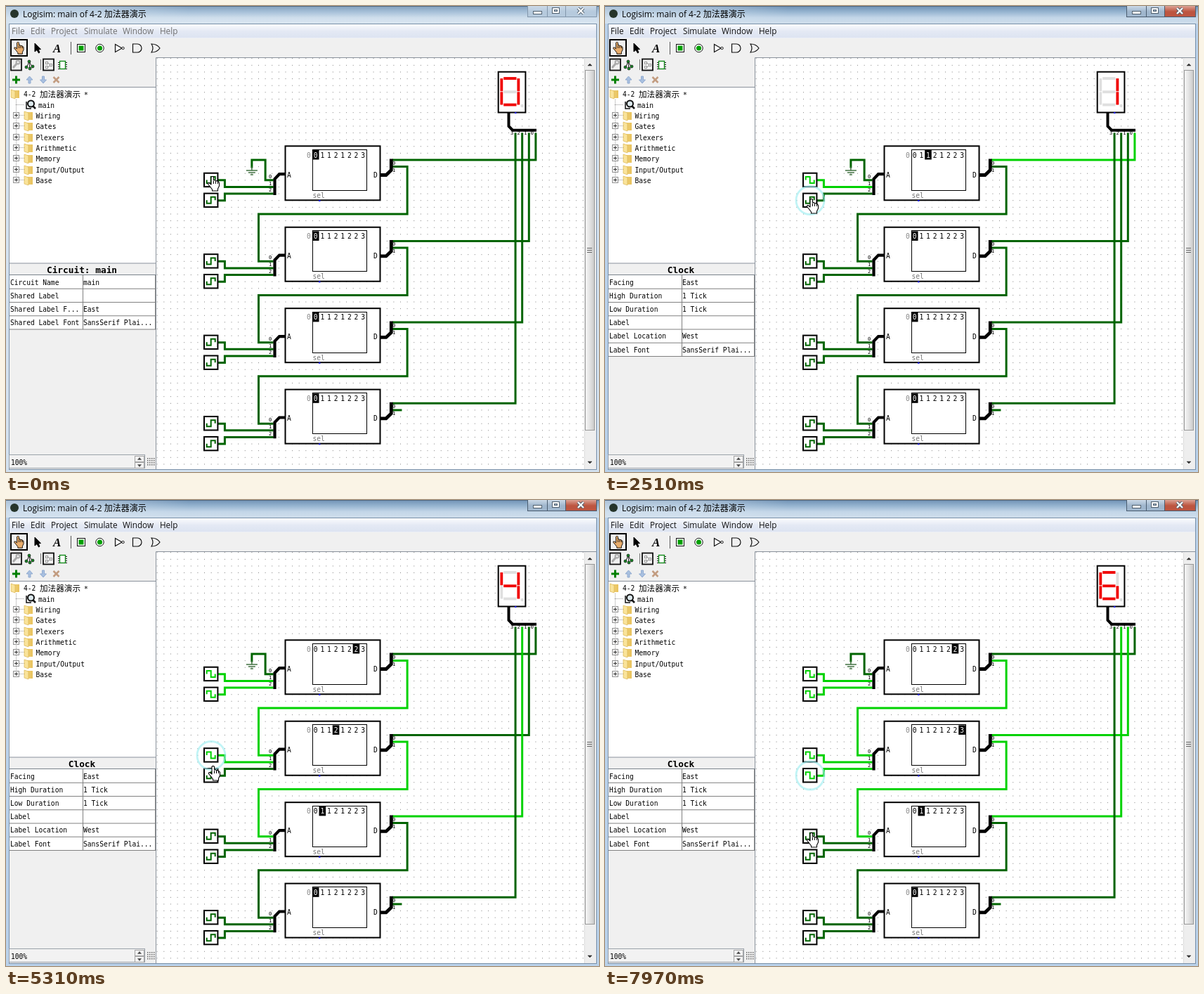
These frames come from a looping animation (844 px wide and 663 px high, 8 s). An HTML page with a canvas:

```html
<!DOCTYPE html>
<html lang="en">
<head>
<meta charset="utf-8">
<title>Adder circuit demo</title>
<style>
html, body { margin: 0; height: 100%; overflow: hidden; background: #f0f0f0; }
canvas { display: block; }
</style>
</head>
<body>
<canvas id="stage" width="844" height="663"></canvas>
<script>
const g = document.getElementById('stage').getContext('2d');
const MONO = '9.62px "DejaVu Sans Mono", monospace';
const TINY = '7px "DejaVu Sans Mono", monospace';
const UI = '11.7px "Open Sans", "Noto Sans CJK SC", "Noto Sans CJK", sans-serif';
const CJK = '11.6px "Noto Sans CJK SC", "Noto Sans CJK", sans-serif';
const SCALE = .962, GRID = 10 * SCALE, LOOP = 8000;
const X = i => 359.5 + GRID * i;
const Y = j => 219 + GRID * j;
const wireColor = on => on ? '#00d200' : '#006400';

function fill(x, y, w, h, color) {
  g.fillStyle = color;
  g.fillRect(x, y, w, h);
}
function frame(x, y, w, h, color, width = 1) {
  g.strokeStyle = color;
  g.lineWidth = width;
  g.strokeRect(x, y, w, h);
}
function line(points, color, width = 1, inside) {
  g.beginPath();
  points.forEach(p => g.lineTo(p[0], p[1]));
  if (inside) {
    g.closePath();
    g.fillStyle = inside;
    g.fill();
  }
  g.strokeStyle = color;
  g.lineWidth = width;
  g.stroke();
}
function circle(x, y, r, inside, color, width = 1) {
  g.beginPath();
  g.arc(x, y, r, 0, 7);
  if (inside) { g.fillStyle = inside; g.fill(); }
  if (color) { g.strokeStyle = color; g.lineWidth = width; g.stroke(); }
}
function text(s, x, y, color = '#000', font = MONO, align = 'left') {
  g.font = font;
  g.fillStyle = color;
  g.textAlign = align;
  g.fillText(s, x, y);
}
function gradient(x0, y0, x1, y1, ...colors) {
  const grad = g.createLinearGradient(x0, y0, x1, y1);
  colors.forEach((c, i) => grad.addColorStop(i / (colors.length - 1), c));
  return grad;
}
function hand(x, y, skin = '#fff', scale = 1) {
  g.save();
  g.translate(x, y);
  g.scale(scale, scale);
  g.lineJoin = 'round';
  line([[5, 1.5], [6, .5], [7.5, .5], [8.5, 1.5], [8.5, 6], [10.5, 5.5], [11.5, 7], [13.5, 6.5], [14.5, 8],
    [15.5, 8], [16.5, 9.5], [16.5, 14], [14.5, 18], [14.5, 21], [6.5, 21], [6.5, 19], [3.5, 15],
    [.5, 11.5], [.5, 10], [2, 9.5], [5, 12]], '#000', 1.1, skin);
  [8.5, 11.5, 14.5].forEach(k => line([[k, 7], [k, 11]], '#000'));
  g.restore();
}

// ---- window, menus and side panels ----
function windowFrame(active) {
  fill(0, 0, 844, 663, active ? '#b9d1ea' : '#d3e1ef');
  fill(0, 0, 844, 25, active ? gradient(0, 0, 0, 25, '#6f91b4', '#96b4d0', '#c3d6e8', '#cfdeec')
    : gradient(0, 0, 0, 25, '#829fbd', '#a6c0d8', '#cfdeec', '#dae6f1'));
  fill(0, 0, 260, 25, gradient(0, 0, 260, 0, 'rgba(215,228,240,.6)', 'rgba(215,228,240,.5)', 'rgba(215,228,240,0)'));
  fill(0, 0, 844, 1, '#52687f');
  circle(12, 11, 6, '#26352b');
  text('Logisim: main of 4-2 加法器演示', 24, 16, '#000', UI.replace('11.7', '12'));

  const tones = active ? ['#9fb6cd', '#9fb6cd', '#bd5540'] : ['#b6cadd', '#b6cadd', '#b6cadd'];
  [[742, 28], [770, 26], [796, 44]].forEach(([x, w], i) => {
    fill(x, 0, w, 16, gradient(0, 0, 0, 16, i == 2 && active ? '#dca294' : '#cbd9e7', tones[i], tones[i]));
    frame(x + .5, -.5, w, 16, active ? '#4b5d70' : '#8397ac');
  });
  fill(751, 8, 11, 4, '#fff');
  frame(750.5, 7.5, 12, 4, '#50606f');
  frame(777.5, 2.5, 10, 8, '#50606f');
  frame(779, 4, 7, 5, '#fff', 2);
  frame(780.5, 5.5, 4, 2, '#50606f');
  for (const [c, w] of [['#50606f', 4], ['#fff', 2.3]]) {
    line([[814, 3], [822, 11]], c, w);
    line([[822, 3], [814, 11]], c, w);
  }

  frame(4.5, 25.5, 836, 634, '#7990a8');
  fill(5, 26, 835, 633, '#f0f0f0');
  fill(5, 26, 835, 20, gradient(0, 26, 0, 46, '#fbfcfe', '#e4e9f4', '#dce3f1'));
  fill(5, 45, 835, 1, '#eceff6');
  const menu = { File: 8, Edit: 35, Project: 64, Simulate: 111, Window: 166, Help: 219 };
  for (const name in menu) text(name, menu[name], 39.5, active ? '#111' : '#707070', UI);
}

function toolbars() {
  frame(7, 48, 23, 23, '#000', 2);
  hand(11.5, 51, '#e9ad6c', .82);
  line([[41, 53], [41, 65], [44, 62.5], [46.5, 67], [48, 66], [46, 62], [49.5, 61.5]], '#000', 1, '#000');
  text('A', 67, 66, '#000', 'italic bold 17px "Liberation Serif", serif');
  fill(92, 51, 1, 18, '#555');
  fill(101.5, 54.5, 11, 11, '#fff');
  frame(101.5, 54.5, 11, 11, '#111');
  fill(103.5, 56.5, 7, 7, '#00a000');
  circle(133.5, 60, 5.7, '#fff', '#111');
  circle(133.5, 60, 3.6, '#00a000');
  line([[155.5, 54.5], [165, 60], [155.5, 65.5]], '#111', 1.2, '#fff');
  circle(166.5, 60, 1.7, '#fff', '#111');
  g.lineWidth = 1.2;
  g.stroke(new Path2D('M180.5 54H187A6 6 0 0 1 187 66H180.5Z M207 54Q215 54 219 60Q215 66 207 66Q211 60 207 54Z'));

  frame(7, 75.5, 15, 16, '#111', 1.8);
  line([[10, 88], [16, 81]], '#aaa', 3);
  circle(17, 80, 2.5, null, '#aaa', 2);
  line([[29, 88], [33, 79], [38, 88]], '#222');
  line([[33, 79], [34, 90]], '#222');
  [[33, 79], [29, 87], [34, 89], [38, 86]].forEach(p => circle(p[0], p[1], 2, '#168a24', '#111', .7));
  fill(49, 76, 1, 15, '#777');
  frame(53, 75.5, 15, 16, '#111', 1.8);
  frame(56.5, 79.5, 3, 3, '#999');
  frame(56.5, 85.5, 3, 3, '#999');
  frame(62.5, 82.5, 3, 3, '#999');
  line([[60, 81], [63, 84], [60, 87]], '#999');
  fill(77, 79, 7, 11, '#fff');
  frame(76.5, 78.5, 8, 11, '#138a1b', 1.4);
  for (let y = 80; y < 90; y += 3) { fill(74, y, 2, 1, '#222'); fill(85, y, 2, 1, '#222'); }

  fill(9, 103.5, 11, 3, '#008000');
  fill(13, 99.5, 3, 11, '#008000');
  line([[33.5, 100], [38, 105], [35, 105], [35, 110], [32, 110], [32, 105], [29, 105]], '#91abd0', 1, '#a9c0e0');
  line([[53, 110], [57.5, 105], [54.5, 105], [54.5, 100], [51.5, 100], [51.5, 105], [48.5, 105]], '#91abd0', 1, '#a9c0e0');
  line([[67.5, 101], [75.5, 109]], '#c29c80', 2.5);
  line([[75.5, 101], [67.5, 109]], '#c29c80', 2.5);
}

function folder(x, y) {
  fill(x + 4, y - 5, 8, 11, gradient(x, 0, x + 12, 0, '#f3d67e', '#e8c25e'));
  line([[x, y - 6], [x + 6, y - 4], [x + 6, y + 7], [x, y + 5]], '#dcb552', .7, '#f9e39a');
}
function tree() {
  fill(5, 116, 208, 250, '#fff');
  frame(4.5, 115.5, 209, 250.5, '#8a929c');
  g.setLineDash([1, 1]);
  line([[14.5, 133], [14.5, 248]], '#999');
  line([[14, 140.5], [26, 140.5]], '#999');
  g.setLineDash([]);
  folder(7, 125);
  text('4-2', 25, 129);
  text('加法器演示', 48, 129.5, '#000', CJK);
  text('*', 111, 130);
  fill(29, 134, 10, 11, '#fff');
  circle(35.5, 139, 4.5, '#dde9ed', '#111', 2);
  line([[38, 142], [42, 146]], '#111', 2.5);
  line([[29, 136], [29, 146], [36, 146]], '#111', 1.5);
  text('main', 46, 144.5);
  ['Wiring', 'Gates', 'Plexers', 'Arithmetic', 'Memory', 'Input/Output', 'Base'].forEach((name, i) => {
    const y = Math.round(156 + 15.37 * i);
    fill(10, y - 5, 9, 9, '#fff');
    frame(10.5, y - 4.5, 8, 8, '#919191');
    fill(12, y - 1, 5, 1, '#333');
    fill(14, y - 3, 1, 5, '#333');
    g.setLineDash([1, 1]);
    line([[19, y - .5], [26, y - .5]], '#999');
    g.setLineDash([]);
    folder(26, y);
    text(name, 42.5, y + 4);
  });
}

const circuitProps = ['Circuit Name|main', 'Shared Label|', 'Shared Label F...|East', 'Shared Label Font|SansSerif Plai...'];
const clockProps = ['Facing|East', 'High Duration|1 Tick', 'Low Duration|1 Tick', 'Label|', 'Label Location|West', 'Label Font|SansSerif Plai...'];
function properties(active) {
  const rows = active ? clockProps : circuitProps, rowHeight = 20 * SCALE;
  text(active ? 'Clock' : 'Circuit: main', 108, 379.5, '#000', 'bold 12.8px "DejaVu Sans Mono", monospace', 'center');
  fill(5, 383, 208, rowHeight * rows.length, '#fff');
  fill(5, 382, 208, 1, '#7a838c');
  rows.forEach((row, i) => {
    const y = 383 + rowHeight * i, [name, value] = row.split('|');
    text(name, 6, y + 13.5);
    text(value, 110, y + 13.5);
    fill(5, y + 18.8, 208, 1, '#808080');
  });
  fill(109, 383, 1, rowHeight * rows.length, '#808080');
  fill(212, 383, 1, rowHeight * rows.length, '#808080');

  fill(5, 639, 192, 19, '#f2f2f2');
  frame(4.5, 638.5, 193, 19, '#9ba2aa');
  text('100%', 7, 652.5);
  for (const [y, d] of [[640, -1], [649, 1]]) {
    frame(183.5, y + .5, 13, 8, '#a5a5a5');
    line([[187.5, y + 4.5 - d], [192.5, y + 4.5 - d], [190, y + 4.5 + 2 * d]], '#444', .5, '#444');
  }
  for (let x = 201; x < 212; x += 3)
    for (let y = 643; y < 655; y += 3) fill(x, y, 1.5, 1.5, '#666');
}

function canvasArea() {
  fill(214, 74, 610, 585, '#fff');
  line([[213.5, 659], [213.5, 73.5], [840, 73.5]], '#8a929c');
  for (let i = -15; X(i) < 823; i++)
    for (let j = -15; Y(j) < 658; j++) fill(X(i) - SCALE / 2, Y(j) - SCALE / 2, SCALE, SCALE, '#777');
  fill(824, 74, 16, 585, '#eeeeee');
  fill(823, 74, 1, 585, '#dcdcdc');
  fill(825, 92, 12, 511, gradient(825, 0, 837, 0, '#f6f6f6', '#e3e3e3', '#cbcbcb'));
  frame(824.5, 91.5, 13, 512, '#999');
  for (const y of [344, 347, 350]) fill(827, y, 7, 1, '#666');
  line([[828, 85], [834, 85], [831, 82]], '#333', .5, '#333');
  line([[828, 648], [834, 648], [831, 651]], '#333', .5, '#333');
}

// ---- circuit ----
function clock(j, on) {
  const x = 291.7, y = Y(j) - .4;
  fill(x - 10, y - 10, 20, 20, '#fff');
  frame(x - 9.7, y - 9.7, 19.4, 19.4, '#000', 2);
  const d = on ? -4.5 : 4.5;
  line([[x - 6, y], [x - 6, y + d], [x, y + d], [x, y - d], [x + 6, y - d], [x + 6, y]], wireColor(on), 2);
}
function wire(on, ...points) {
  line(points.map(([i, j]) => [X(i), Y(j)]), wireColor(on), 3);
}

// One adder stage: returns its sum bit and carry bit.
function stage(r, carry, a, b) {
  const j = 12 * r, y = Y(j), address = carry + 2 * a + 4 * b;
  const total = carry + a + b, sum = total & 1, out = total >> 1;
  wire(a, [-6, j + 3], [-5, j + 3], [-5, j + 4], [2.2, j + 4]);
  wire(b, [-6, j + 6], [-5, j + 6], [-5, j + 5], [2.2, j + 5]);
  wire(sum, [19.8, j], [41 - r, j], [41 - r, -4]);
  if (r < 3) wire(out, [19.8, j + 1], [22, j + 1], [22, j + 8], [0, j + 8], [0, j + 15], [2.2, j + 15]);
  else wire(out, [19.8, j + 1], [21.2, j + 1]);
  clock(j + 3, a);
  clock(j + 6, b);

  line([[382.5, y + 50], [382.5, y + 27], [389, y + 20.2], [398, y + 20.2]], '#000', 4.2);
  line([[533, y + 21.5], [541, y + 21.5], [548.3, y + 14.5], [548.3, y - 1.5]], '#000', 4.8);
  for (let k = 0; k < 3; k++) text(k, 374, y + 26 + k * GRID, '#000', TINY);
  for (let k = 0; k < 2; k++) text(k, 550, y + 7 + k * GRID, '#000', TINY);

  fill(397.5, y - 20, 135, 77.5, '#fff');
  frame(397.5, y - 19.7, 135, 77, '#000', 2);
  frame(436.5, Math.round(y - 15) + .5, 77, 58, '#000');
  text('A', 400, y + 24.5);
  text('D', 523, y + 24.5);
  text('sel', 436.5, y + 54, '#777');
  fill(445, y + 57, 2.5, 2, '#2020e0');
  text('0', 428, y - 3.5, '#888');
  [...'01121223'].forEach((digit, k) => {
    const x = 440.7 + k * GRID, hot = k == address;
    if (hot) fill(x - 4.8, y - 14, 9.6, 13.5, '#000');
    text(digit, x, y - 3.5, hot ? '#fff' : '#000', MONO, 'center');
  });
  return [sum, out];
}

// Segment order: top, upper left, upper right, middle, lower left, lower right, bottom.
const digits = { 0: '1110111', 1: '0010010', 2: '1011101', 4: '0111010', 6: '1101111' };
const segments = [[8, 8, 19, 4], [3, 10, 4, 19], [28, 10, 4, 19], [8, 28, 19, 4],
  [3, 30, 4, 19], [28, 30, 4, 19], [8, 47, 19, 4]];
function display(value) {
  fill(700, 93, 40, 59, '#fff');
  frame(700.7, 93.7, 38.7, 57.8, '#000', 2);
  g.save();
  g.translate(700.5, 93.4);
  g.scale(SCALE, SCALE);
  for (const lit of [0, 1])
    segments.forEach((s, i) => { if (digits[value][i] == lit) fill(...s, lit ? '#f00000' : '#dfdfdf'); });
  circle(35.5, 50.5, 2.3, '#dfdfdf');
  g.restore();
  fill(724, 151, 2.5, 2, '#2020e0');
  line([[715.5, 152], [715.5, 171], [721, 176.7], [755, 176.7]], '#000', 4);
  for (let k = 0; k < 4; k++) text(3 - k, 718 + k * GRID, 183, '#000', TINY);
}

function circuit(clocks) {
  wire(0, [-1, 1.2], [-1, 0], [1, 0], [1, 3], [2.2, 3]);
  line([[X(-1), Y(1)], [X(-1), 234]], '#407040', 1.5);
  [8, 5, 2].forEach((w, k) => line([[X(-1) - w, 234 + 3 * k], [X(-1) + w, 234 + 3 * k]], '#407040', 1.5));
  let carry = 0, value = 0, sum;
  for (let r = 0; r < 4; r++) {
    [sum, carry] = stage(r, carry, clocks[2 * r], clocks[2 * r + 1]);
    value += sum << r;
  }
  display(value);
}

// ---- timeline ----
const toggles = [790, 2660, 4920, 6180];
const rings = [[560, 248], [2510, 276.5], [4690, 363.5], [6010, 392]];
// start, end, number of steps, destination
const moves = [[1570, 2120, 8, 287, 274], [3450, 3680, 4, 309, 384], [3757, 4290, 7, 289, 362],
  [5220, 5480, 4, 287, 393], [7110, 7740, 9, 288, 471], [7890, 7970, 2, 287, 473]];
function pointer(t) {
  let x = 287, y = 242;
  for (const [start, end, steps, tx, ty] of moves) {
    if (t < start) break;
    const n = Math.floor((t - start) / (end - start) * (steps - 1) + 1e-6) + 1;
    const p = Math.min(1, n / steps), e = p * p * (3 - 2 * p);
    x += (tx - x) * e;
    y += (ty - y) * e;
  }
  return [Math.round(x), Math.round(y)];
}

function draw(t) {
  const active = t >= 560;
  windowFrame(active);
  toolbars();
  tree();
  properties(active);
  canvasArea();
  g.lineJoin = 'miter';
  circuit(Array.from({ length: 8 }, (_, i) => +(t >= toggles[i])));
  const ring = rings.filter(r => t >= r[0]).pop();
  if (ring) circle(292, ring[1], 20, null, 'rgba(160,238,242,.65)', 2.8);
  hand(...pointer(t));
}

const began = performance.now();
function tick() {
  draw((performance.now() - began) % LOOP);
  requestAnimationFrame(tick);
}
tick();
</script>
</body>
</html>
```
